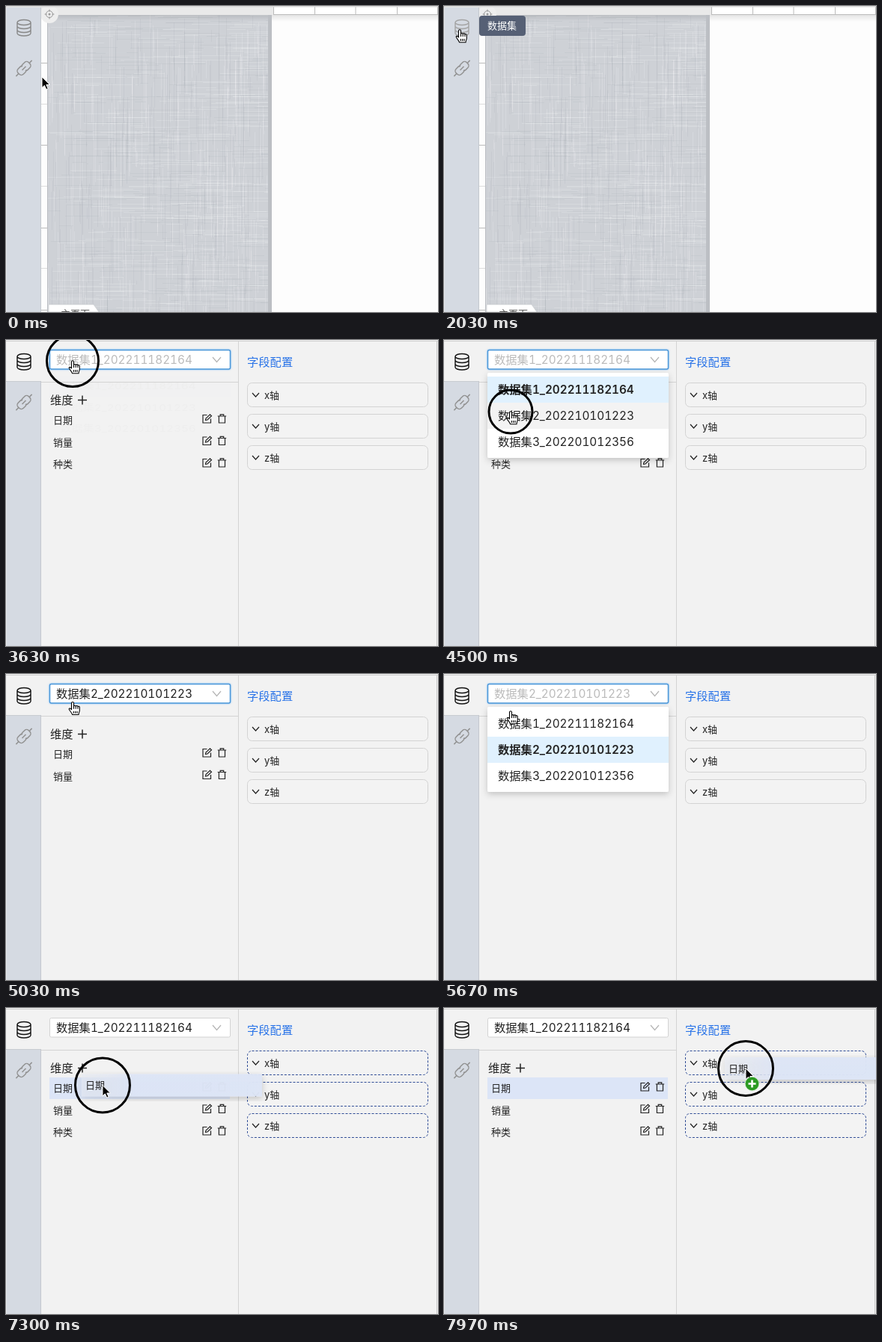
An HTML page that plays this animation: 577x410 px, repeating every 8 s.

```html
<!DOCTYPE html>
<html lang="zh">
<head>
<meta charset="utf-8">
<style>
  html, body { margin: 0; height: 100%; overflow: hidden; background: #f2f2f2; }
  svg { display: block; width: 577px; height: 410px; }
  text { font: 13px Inter, "Noto Sans CJK SC", "Noto Sans CJK", sans-serif; font-variant-numeric: tabular-nums; fill: #222; }
  .big { font-size: 15.3px; }
  .line { fill: none; stroke: #222; stroke-width: 1.2; }
</style>
</head>
<body>
<svg id="stage" viewBox="0 0 577 410"></svg>
<script>
const LOOP = 8000;
const names = ['数据集1_202211182164', '数据集2_202210101223', '数据集3_202201012356'];
const fields = ['日期', '销量', '种类'];
const axes = ['x轴', 'y轴', 'z轴'];

const rect = (x, y, w, h, fill, more = '') =>
  `<rect x="${x}" y="${y}" width="${w}" height="${h}" fill="${fill}" ${more}/>`;
const text = (x, y, s, more = '') => `<text x="${x}" y="${y}" ${more}>${s}</text>`;
const line = (d, more = '') => `<path class="line" d="${d}" ${more}/>`;
const each = (list, make) => list.map(make).join('');

// Woven cloth: short faint threads in both directions
let seed = 7;
const random = () => (seed = seed * 16807 % 2147483647) / 2147483647;
function threads(count, color, opacity) {
  let d = '';
  for (let i = 0; i < count; i++) {
    const x = 56 + random() * 294 | 0, y = 12 + random() * 398 | 0, n = 15 + random() * 75 | 0;
    d += i % 2 ? `M${x} ${y}.5H${Math.min(350, x + n)}` : `M${x}.5 ${y}v${n}`;
  }
  return line(d, `style="stroke:${color};stroke-width:1;stroke-opacity:${opacity}"`);
}

const editor = `<g id="editor">
  ${rect(47, 0, 310, 12, '#e9e9e9')}
  ${rect(55, 12, 300, 398, '#ced1d6')}
  ${threads(650, '#fff', .17)}${threads(450, '#8a929e', .1)}
  ${rect(55, 12, 300, 8, 'url(#shade)')}
  ${rect(350, 12, 5, 398, '#bcbfc4')}
  ${rect(355, 12, 222, 398, '#fdfdfd')}${rect(355, 12, 222, 9, 'url(#shade)')}
  ${rect(357, 1, 220, 11, '#fff')}
  ${line('M357 11.5H577M357.5 1V12M412.5 1V12M467 1V12M522.5 1V12M576.5 1V12', 'style="stroke:#bbb;stroke-width:1"')}
  ${rect(47, 12, 8, 398, '#fdfdfd')}
  ${each([76, 131, 186, 241, 297, 351, 407], (y, i) => rect(47, y, 8, 1, i % 2 ? '#ddd' : '#bbb'))}
  ${rect(55, 12, 1, 398, '#bbbec3')}
  <circle cx="58" cy="11" r="12" fill="#eee"/>
  ${line('M58 4.500v3M58 14.500v3M51.500 11h3M61.500 11h3M62.500 11a4.500 4.500 0 1 1-9 0a4.500 4.500 0 1 1 9 0', 'style="stroke:#999;stroke-width:1"')}
  <circle cx="58" cy="11" r="1.500" fill="#999"/>
  <path d="M57 400H117L124 410H57z" fill="#fff" stroke="#c5c8cc" stroke-width=".6"/>
  ${text(73, 417, '主页面', 'style="fill:#555"')}
  ${rect(0, 0, 577, 1.5, '#d8d8d8')}
</g>`;

const panel = `<g id="panel">
  ${rect(0, 0, 577, 410, '#f2f2f2')}
  ${rect(0, 1, 577, 1, '#cfcfcf')}
  ${rect(310, 2, 1, 408, '#d3d3d3')}${rect(575, 2, 1, 408, '#c8c8c8')}
  ${rect(46, 56, 264, 1, '#d3d3d3')}
  ${rect(58.5, 13.5, 241, 25.5, '#fff', 'id="select" rx="2"')}
  ${text(67, 32, '', 'id="chosen" class="big"')}
  ${line('M276 23l5.500 6.500 5.500-6.500', 'style="stroke:#b5b5b5"')}
  ${text(59, 86, '维度', 'class="big"')}
  ${line('M96 80.500h12M102 74.500v12', 'id="plus" style="stroke-width:1.5"')}
  ${each(fields, (name, i) => {
    const y = 106 + i * 29.5;
    return `<g class="field">${rect(58, y - 13, 241, 29, '#dce5f7', 'class="glow"')}
      ${text(63, y + 6, name)}
      ${line('M7 1.500H1.500V12H12V6.500M5 8.500L5.500 6 11 .8l2 1.900L7.500 8z', `transform="translate(261.500 ${y - 7})"`)}
      ${line('M0 3H11.500M3.500 3V.8H8V3M1.700 3.200V12H9.800V3.200', `transform="translate(282.700 ${y - 7})"`)}</g>`;
  })}
  ${text(322, 35, '字段配置', 'class="big" style="fill:#2a74e8"')}
  ${each(axes, (name, i) => {
    const y = 57.5 + i * 42;
    return rect(322.5, y, 241, 32, '#f3f3f3', 'class="axis" rx="6"') +
      line(`M329 ${y + 13.5}l4.500 5 4.500-5`) + text(345, y + 21, name);
  })}
  <g id="menu">
    ${rect(58, 44, 242, 114, '#fff', 'rx="2" filter="url(#drop)"')}
    ${each(names, (name, i) => rect(58, 49 + i * 35, 242, 35, '#fff', 'class="row"') +
      text(72, 72 + i * 35, name, 'class="big option"'))}
  </g>
</g>`;

const sidebar = `${rect(0, 2, 46, 408, '#d5dae2')}${rect(0, 2, 1, 408, '#e6e8ec')}
  ${rect(46, 2, 1, 408, '#c4c8ce')}
  <g id="tab">${rect(0, 2, 47, 53, '#f2f2f2')}${rect(0, 55, 46, 1, '#c8cbd0')}</g>
  <g id="database">${line('M15 22a9 3.500 0 0 1 18 0a9 3.500 0 0 1-18 0V36.500a9 3.500 0 0 0 18 0V22M15 27a9 3.500 0 0 0 18 0M15 32a9 3.500 0 0 0 18 0', 'style="stroke:inherit;stroke-width:1.4"')}</g>
  <g transform="translate(24 83.500) rotate(-45)">
    ${line('M-15 0h5M10 0h5M-3.500 0h7M1 -3.500a4 4 0 0 0-3-1.500h-4a4 4 0 0 0-4 4v2a4 4 0 0 0 4 4h4a4 4 0 0 0 3-1.500M-1 3.500a4 4 0 0 0 3 1.500h4a4 4 0 0 0 4-4v-2a4 4 0 0 0-4-4h-4a4 4 0 0 0-3 1.500', 'style="stroke:#929292;stroke-width:1.5"')}
  </g>`;

stage.innerHTML = `<defs>
    <linearGradient id="shade" x2="0" y2="1"><stop stop-color="#000" stop-opacity=".1"/><stop offset="1" stop-opacity="0"/></linearGradient>
    <linearGradient id="fade"><stop stop-color="#e6eaf2" stop-opacity=".55"/><stop offset=".3" stop-color="#dde5f6" stop-opacity=".97"/></linearGradient>
    <filter id="drop" x="-10%" y="-10%" width="120%" height="130%"><feDropShadow dx="0" dy="3" stdDeviation="4" flood-opacity=".2"/></filter>
  </defs>
  ${editor}${panel}${sidebar}
  <g id="tip">${rect(47, 13, 62, 27, '#566075', 'rx="4"')}${text(58, 31, '数据集', 'style="fill:#fff"')}</g>
  <g id="ghost">${rect(58, 92, 241, 30, 'url(#fade)', 'filter="url(#drop)"')}${text(63, 112, '日期')}</g>
  <circle id="ring" fill="none" stroke="#000" stroke-width="3"/>
  <g id="pointer" stroke-linejoin="round">
    <path id="arrow" d="M0 0V14.500l3.400-3.100 2.400 5.300 2.400-1-2.400-5.200h4.700z" stroke="#fff" stroke-width="1"/>
    <path id="hand" d="M-1.500 9V1.300a1.500 1.500 0 0 1 3 0V5.500a1.400 1.400 0 0 1 2.700.2a1.400 1.400 0 0 1 2.700.5a1.300 1.300 0 0 1 2.400.8V11c0 2-1.300 3-1.300 5.800H-.5C-.8 14-4.800 11-4.800 9.300c0-1.400 1.800-1.400 3.300.7zM1.500 5.500V9M4.200 6V9M6.900 6.500V9M1.300 12v3M3.700 12v3M6 12v3" fill="#fff" stroke="#000" stroke-width="1.100"/>
    <g id="badge"><circle cx="8.500" cy="20.500" r="9.300" fill="#2b9a22" stroke="#d5ecd2" stroke-width=".8"/>
      <path d="M3.500 20.500h10M8.500 15.500v10" stroke="#fff" stroke-width="2.600"/></g>
  </g>`;

const $ = id => document.getElementById(id);
const all = name => [...document.querySelectorAll('.' + name)];
const show = (node, on) => node.style.display = on ? '' : 'none';
const within = (t, a, b) => t >= a && t < b;
const ramp = (t, a, b) => Math.min(1, Math.max(0, (t - a) / (b - a)));
const ease = p => p * p * (3 - 2 * p);

// Pointer path: time, x, y
const path = [
  [430, 48, 95], [970, 21, 32], [3130, 21, 32], [3500, 89, 28], [3930, 89, 28], [4230, 89, 96],
  [4650, 89, 96], [5150, 89, 28], [5480, 89, 28], [5850, 89, 70], [6170, 89, 70], [6500, 101, 80],
  [6620, 101, 80], [6930, 86, 107], [7130, 86, 107], [7870, 403, 81]
];
function pointerAt(t) {
  const i = path.findIndex(p => p[0] > t);
  if (i === 0) return path[0].slice(1);
  if (i < 0) return path[path.length - 1].slice(1);
  const [a, b] = [path[i - 1], path[i]], p = ease(ramp(t, a[0], b[0]));
  return [a[1] + (b[1] - a[1]) * p, a[2] + (b[2] - a[2]) * p];
}

const OPEN = 2860, PRESS = 7070;
const clicks = [[2595, 2720], [3540, 3650], [4495, 4610], [5270, 5390], [5930, 6050], [PRESS, LOOP]];
const menus = [[3620, 4620], [5390, 6040]];

function draw(t) {
  const [x, y] = pointerAt(t);
  const opened = t >= OPEN, dragging = t >= PRESS + 60;
  const picked = within(t, 4600, 6040) ? 1 : 0;

  show($('editor'), !opened);
  show($('panel'), opened);
  show($('tab'), opened);
  const grey = 136 + 28 * ramp(t, 1230, 1400);
  $('database').style.stroke = opened ? '#111' : `rgb(${grey},${grey},${grey})`;
  $('tip').style.opacity = opened ? 0 : ramp(t, 1950, 2020);

  const menu = menus.find(m => within(t, m[0], m[1] + 160));
  const shown = menu ? ease(ramp(t, menu[0], menu[0] + 180) * (1 - ramp(t, menu[1], menu[1] + 150))) : 0;
  show($('menu'), menu);
  $('menu').style.opacity = shown;
  $('menu').setAttribute('transform', `translate(0 44) scale(1 ${.8 + .2 * shown}) translate(0 -44)`);
  const hover = Math.floor((y - 56) / 35);
  all('row').forEach((row, i) => row.setAttribute('fill', i === picked ? '#e0f1fe' : i === hover ? '#f3f3f3' : '#fff'));
  all('option').forEach((option, i) => option.style.fontWeight = i === picked ? 600 : 400);

  const focused = within(t, 3540, PRESS);
  $('select').style.cssText = focused
    ? 'stroke:#4a96d8;stroke-width:1.5;filter:drop-shadow(0 0 1px #1890ff88)' : 'stroke:#d3d3d3';
  $('chosen').textContent = names[picked];
  $('chosen').style.fill = menu && t < menu[1] ? '#bbb' : '#222';

  all('field').forEach((field, i) => show(field, i < 2 || !picked));
  all('glow').forEach((glow, i) => show(glow, i === 0 && (dragging || t > 6620 && y > 93)));
  const onPlus = t > 6200 && Math.hypot(x - 102, y - 80) < 8;
  $('plus').style.stroke = onPlus ? '#7fa865' : '#222';
  all('axis').forEach(box => box.style.cssText = dragging
    ? 'stroke:#2f4c96;stroke-dasharray:3 2' : 'stroke:#d3d3d3');

  show($('ghost'), dragging);
  $('ghost').setAttribute('transform', `translate(${x - 86} ${y - 107})`);
  const click = clicks.find(c => within(t, c[0], c[1]));
  show($('ring'), click);
  if (click) {
    $('ring').setAttribute('cx', x);
    $('ring').setAttribute('cy', y);
    $('ring').setAttribute('r', 29 + 7.5 * ramp(t, click[0] + 10, click[0] + 120));
  }
  $('pointer').setAttribute('transform', `translate(${x} ${y})`);
  show($('hand'), t >= 1230 && !dragging);
  show($('arrow'), t < 1230 || dragging);
  show($('badge'), t >= 7890);
}

function tick() {
  draw(performance.now() % LOOP);
  requestAnimationFrame(tick);
}
tick();
</script>
</body>
</html>
```
